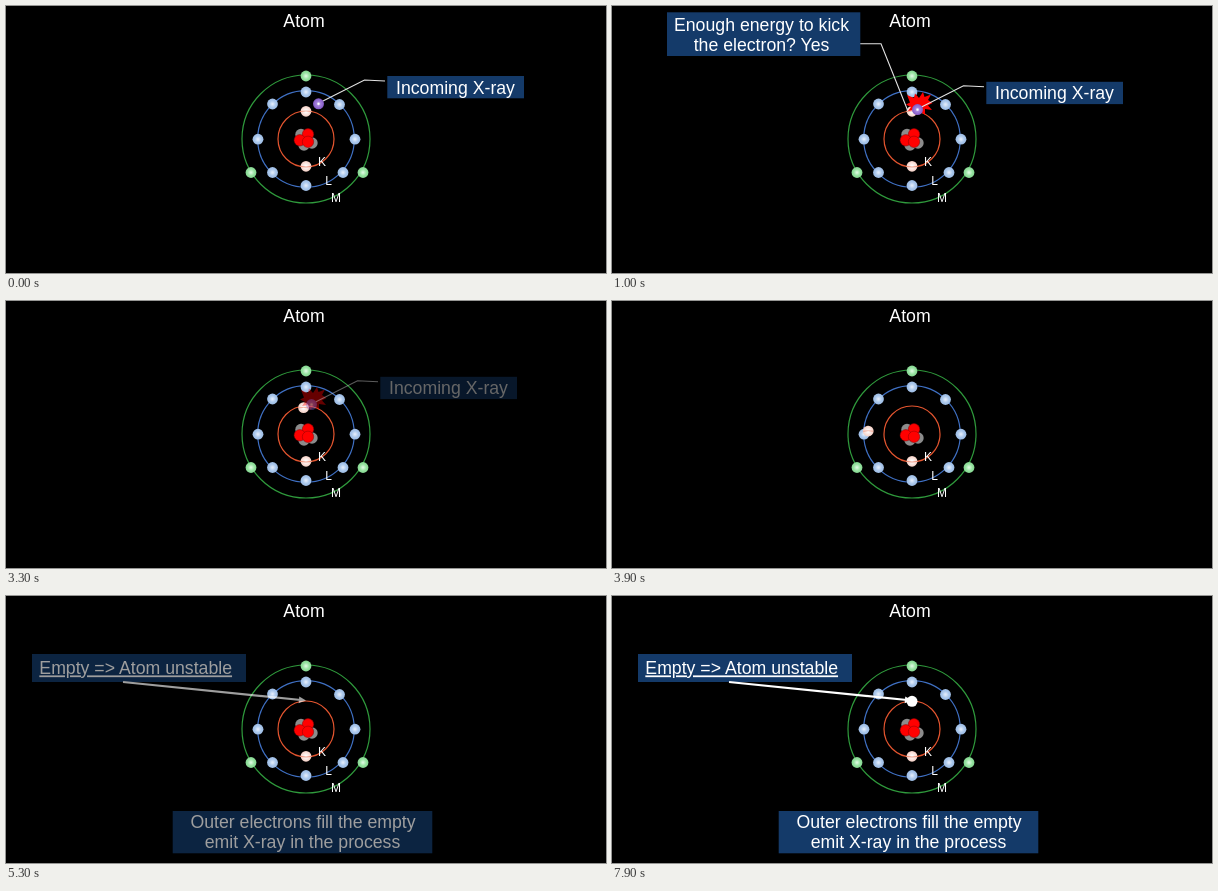
These frames come from a looping animation (600x267 px, 8000 ms). An HTML page:

```html
<!DOCTYPE html>
<html lang="en">
<head>
<meta charset="utf-8">
<title>Atom</title>
<style>
  html, body { margin: 0; width: 100%; height: 100%; overflow: hidden; background: #000; }
  svg { display: block; width: 600px; height: 267px; }
  text { font: 17.7px "Liberation Sans", Arial, sans-serif; fill: #fff; text-anchor: middle; }
  .shell { font-size: 12px; }
  .box { fill: #143a69; }
  .lead { fill: none; stroke: #e4e4e4; stroke-width: 1.1; }
  .ring { fill: none; stroke-width: 1.2; }
</style>
</head>
<body>
<svg viewBox="0 0 600 267">
  <defs>
    <radialGradient id="gL"><stop offset=".1" stop-color="#dfeafa"/><stop offset=".6" stop-color="#abc8ec"/><stop offset="1" stop-color="#9dbce4"/></radialGradient>
    <radialGradient id="gM"><stop offset=".1" stop-color="#d8f8dc"/><stop offset=".6" stop-color="#98e3a2"/><stop offset="1" stop-color="#84d690"/></radialGradient>
    <radialGradient id="gK"><stop offset=".1" stop-color="#fff"/><stop offset=".6" stop-color="#fae4de"/><stop offset="1" stop-color="#f4cfc4"/></radialGradient>
    <radialGradient id="gX"><stop offset=".1" stop-color="#fff"/><stop offset=".35" stop-color="#a583dc"/><stop offset="1" stop-color="#8257c4"/></radialGradient>
  </defs>

  <text x="298" y="20.5">Atom</text>
  <g id="atom"></g>
  <text class="shell" x="316" y="159.5">K</text>
  <text class="shell" x="322.7" y="179.3">L</text>
  <text class="shell" x="330" y="196.3">M</text>

  <g id="electron">
    <circle r="5.4" fill="url(#gK)"/>
    <path d="M-5 .2Q0 -.8 5 .2" fill="none" stroke="#e8603c" stroke-opacity=".45"/>
  </g>

  <path id="burst" fill="#f00" d="M307 92L311 86L312.500 91L319 88.500L316 94L320.500 97L316 99.500L320 104L313 103L313 109L308 105L304 109L302 104L296 105L299 101L294 98.500L298 96.500L295 89L302 92L303 87.500Z"/>

  <g id="xray">
    <path class="lead" d="M316 95.500L358.500 74L379 75"/>
    <circle cx="312.500" cy="97.800" r="5.500" fill="url(#gX)"/>
    <rect class="box" x="381.300" y="70" width="136.700" height="22.300"/>
    <text x="449.500" y="87.600">Incoming X-ray</text>
  </g>

  <g id="question">
    <path class="lead" d="M248 37.700H269L295.500 104"/>
    <rect class="box" x="55" y="6.300" width="193.300" height="43.700"/>
    <text x="149.500" y="25.200">Enough energy to kick</text>
    <text x="149.500" y="45.200">the electron? Yes</text>
  </g>

  <g id="result">
    <rect class="box" x="26" y="58" width="214" height="28"/>
    <text x="129.700" y="78.400" text-decoration="underline">Empty =&gt; Atom unstable</text>
    <path d="M117 86L295 104" stroke="#fff" stroke-width="2.200"/>
    <path d="M300 104.500L292.600 107.200L293.300 100.400Z" fill="#fff"/>
    <rect class="box" x="166.700" y="215" width="259.600" height="42.300"/>
    <text x="297" y="232.300">Outer electrons fill the empty</text>
    <text x="296.500" y="252.300">emit X-ray in the process</text>
  </g>

  <circle id="gap" cx="300" cy="105.300" r="5.500" fill="#fff"/>
</svg>
<script>
const LOOP = 8000, STEP = 100;
const $ = id => document.getElementById(id);

// Static atom: shells, electrons, nucleus
const ring = (r, color) => `<circle class="ring" cx="300" cy="133" r="${r}" stroke="${color}"/>`;
const balls = (fill, points, r = 5.4) =>
  points.map(([x, y]) => `<circle cx="${x}" cy="${y}" r="${r}" fill="${fill}"/>`).join('');
const nucleon = fill => points => balls(fill, points, 5.7);

$('atom').innerHTML =
  ring(64, '#2f9a3c') + ring(48.3, '#3f70c4') + ring(28, '#e4552f') +
  balls('url(#gM)', [[300, 70], [245, 166.5], [357, 166.5]]) +
  balls('url(#gL)', [[300, 86], [333.5, 98.5], [349, 133.2], [337, 166.5],
                     [300, 179.5], [266.5, 166.5], [252, 133.2], [266.5, 98]]) +
  balls('url(#gK)', [[300, 160.3]]) +
  '<path d="M295 160.500Q300 161.500 305 160.500" fill="none" stroke="#e8603c" stroke-opacity=".6"/>' +
  nucleon('#8c8c8c')([[295, 128.5], [306, 137], [298, 139]]) +
  '<g stroke="#800" stroke-width=".5">' +
  nucleon('#f00')([[302, 128.3], [293.8, 134.3], [302, 135.8]]) + '</g>';

const ramp = (t, from, to) => Math.min(1, Math.max(0, (t - from) / (to - from)));
const ease = u => u * u * (3 - 2 * u);
const fade = (id, value) => $(id).setAttribute('opacity', value);
const move = (id, x, y) => $(id).setAttribute('transform', `translate(${x} ${y})`);

function draw(t) {
  const arrive = 1 - (1 - ramp(t, 0, 300)) ** 2;
  move('xray', -7 * arrive, 5.8 * arrive);

  const leave = 1 - ramp(t, 3000, 3500);
  fade('xray', leave);
  fade('burst', ramp(t, 200, 400) * leave);
  fade('question', ramp(t, 450, 950) * (1 - ramp(t, 2450, 2950)));

  const eject = ease(ramp(t, 3150, 4700));
  move('electron', 300 - 92 * eject, 105.3 + 52 * eject);
  fade('electron', 1 - ramp(t, 4240, 4740));

  fade('result', ramp(t, 4990, 5490));
  fade('gap', t >= 4500 && t % 1000 >= 500 ? 1 : 0);
}

function tick(now) {
  draw(Math.floor(now % LOOP / STEP) * STEP);
  requestAnimationFrame(tick);
}
draw(0);
requestAnimationFrame(tick);
</script>
</body>
</html>
```
